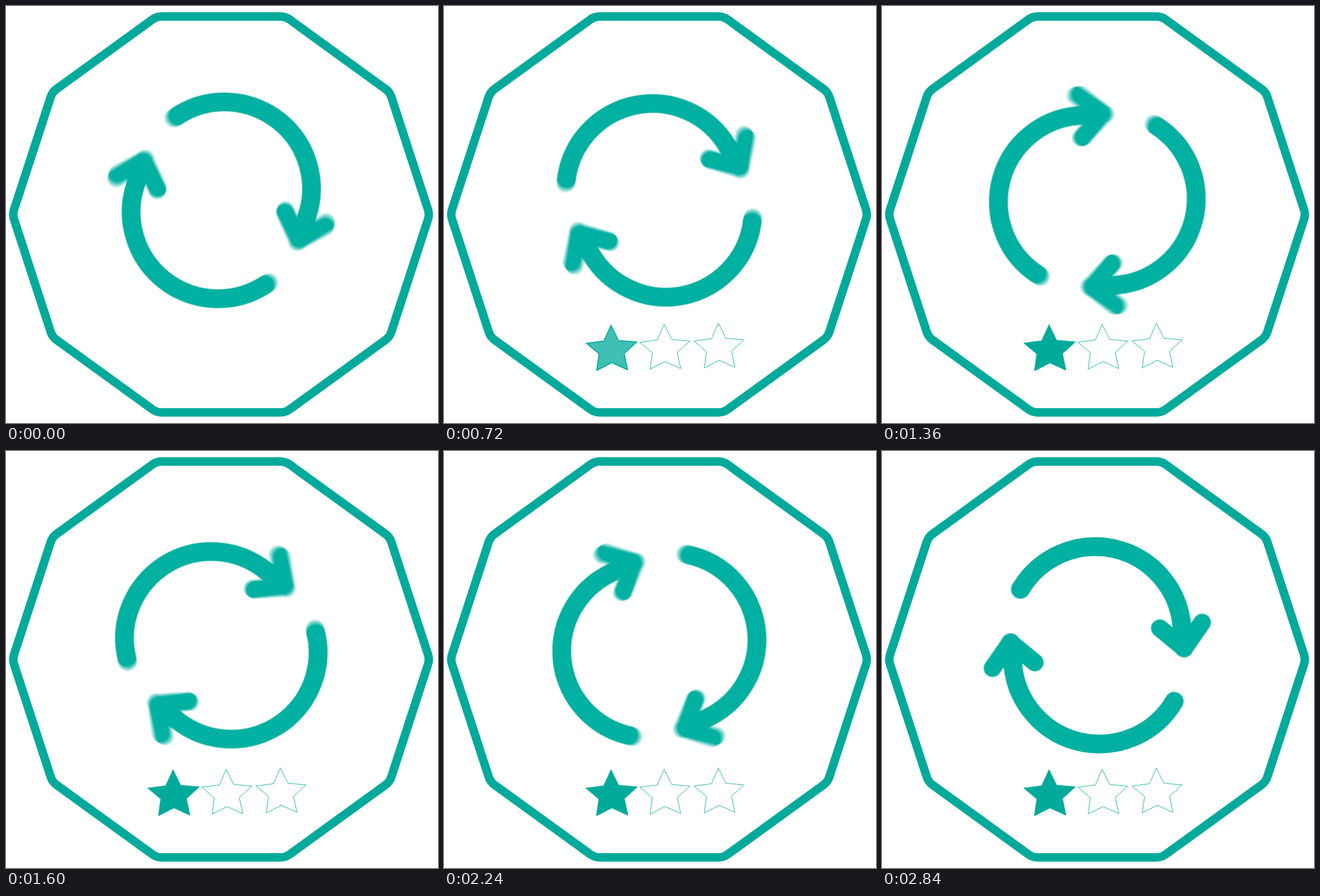
An HTML page without scripts that plays this animation: 761 px wide and 736 px high, repeating every 2880 ms.

```html
<!DOCTYPE html>
<html lang="en">
<head>
<meta charset="utf-8">
<title>Refresh badge</title>
<style>
  :root { --teal: #00aa9b; --loop: 2880ms; }
  html, body { margin: 0; width: 100%; height: 100%; overflow: hidden; background: #fff; }
  svg { display: block; width: 100%; height: 100%; }
  .line { fill: none; stroke: var(--teal); stroke-linejoin: round; stroke-linecap: round; }

  /* a small negative delay keeps steps clear of rounding at their edges */
  .spin, .copy, .stars, .fill { animation: var(--loop) -4ms infinite; }

  .spin, .copy { transform-origin: 379.3px 343px; }
  .spin { isolation: isolate; animation-name: spin; animation-timing-function: steps(72, end); }
  /* additive copies along the arc form the motion blur */
  .copy {
    opacity: .1255;
    mix-blend-mode: plus-lighter;
    animation-name: settle;
    animation-timing-function: step-end;
  }
  .stars { animation-name: show; animation-timing-function: step-end; }
  .fill { fill: var(--teal); animation-name: fade; }

  @keyframes spin {
    from { transform: rotate(25.3deg); }
    to { transform: rotate(547.3deg); }
  }
  @keyframes settle {
    0% { transform: rotate(var(--o)); }
    98.611%, 100% { transform: rotate(min(0deg, calc(var(--o) + .8deg))); }
  }
  @keyframes show {
    0% { opacity: 0; }
    1.389%, 100% { opacity: 1; }
  }
  @keyframes fade {
    0% { opacity: 0; animation-timing-function: steps(24, end); }
    33.333%, 100% { opacity: 1; }
  }
</style>
</head>
<body>
<svg viewBox="0 0 761 736">
  <defs>
    <g id="arrow" class="line">
      <path stroke-width="33" d="M244 244A153 153 0 0 1 528 307L532 348"/>
      <path stroke-width="31" d="M489.5 313L532.5 348.5L564 303"/>
    </g>
    <g id="pair">
      <use href="#arrow"/>
      <use href="#arrow" transform="rotate(180 379.3 343)"/>
    </g>
    <path id="star" d="M388 562L401 588.5L433 591.5L411 611.5L417 640L389.5 627.5L363 641L367 612L345 593.5L375.5 589.5Z"/>
  </defs>

  <path class="line" stroke-width="15" d="M743.4 376.5l-64.6 198.8q-2.8 8.6-10.1 13.9l-169.1 122.8q-7.3 5.3-16.3 5.3h-209q-9 0-16.3-5.3l-169.1-122.8q-7.3-5.3-10.1-13.9l-64.6-198.8q-2.8-8.6 0-17.2l64.6-198.8q2.8-8.6 10.1-13.9l169.1-122.8q7.3-5.3 16.3-5.3h209q9 0 16.3 5.3l169.1 122.8q7.3 5.3 10.1 13.9l64.6 198.8q2.8 8.6 0 17.2z"/>

  <g class="spin">
    <use class="copy" href="#pair" style="--o:-1.75deg"/>
    <use class="copy" href="#pair" style="--o:-1.25deg"/>
    <use class="copy" href="#pair" style="--o:-.75deg"/>
    <use class="copy" href="#pair" style="--o:-.25deg"/>
    <use class="copy" href="#pair" style="--o:.25deg"/>
    <use class="copy" href="#pair" style="--o:.75deg"/>
    <use class="copy" href="#pair" style="--o:1.25deg"/>
    <use class="copy" href="#pair" style="--o:1.75deg"/>
  </g>

  <g class="stars line" style="stroke-linejoin:miter">
    <g transform="translate(-93.8 1.8)" stroke-width="1.6">
      <use href="#star"/>
      <use class="fill" href="#star"/>
    </g>
    <use href="#star" stroke-width=".9"/>
    <use href="#star" stroke-width=".9" transform="translate(95.5 -2.2)"/>
  </g>
</svg>
</body>
</html>
```
